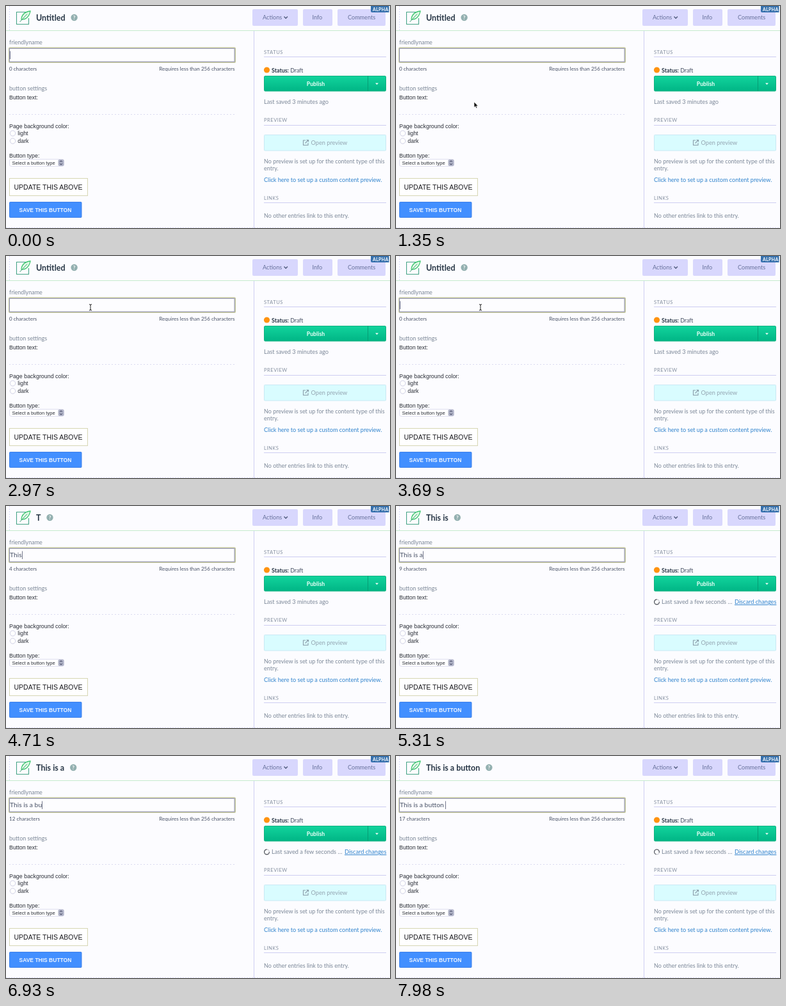
These frames come from a looping animation (600x347 px, 8000 ms). An HTML page:

```html
<!DOCTYPE html>
<html lang="en">
<head>
<meta charset="utf-8">
<title>Entry editor</title>
<style>
  html, body { margin: 0; width: 100%; height: 100%; overflow: hidden; background: #fcfcff; }
  svg { display: block; width: 100%; height: 100%; }
  text { font-family: Lato, sans-serif; font-size: 9.1px; fill: #7b8797; white-space: pre; }
  .form { font-family: "Liberation Sans", Arial, sans-serif; font-size: 8.9px; fill: #2a2e36; }
  .nav { font-size: 9.1px; fill: #66709a; }
  .head { font-size: 7.6px; letter-spacing: .5px; fill: #8590a0; }
  .count { font-size: 8.05px; fill: #475064; }
  .note { font-size: 9px; }
  .link { fill: #2e82cc; }
  .rule { stroke: #cdcdf2; fill: none; }
  .dots { stroke: #dcdcf8; fill: none; stroke-dasharray: 2 2; }
</style>
</head>
<body>
<svg viewBox="0 0 600 347" preserveAspectRatio="none">
  <defs>
    <linearGradient id="green" x2="0" y2="1">
      <stop offset="0" stop-color="#12d49d"/><stop offset="1" stop-color="#00b585"/>
    </linearGradient>
  </defs>
  <rect width="600" height="347" fill="#fcfcff"/>

  <g id="header">
    <path class="dots" d="M5.5 0V38"/>
    <path d="M0 38.5H600" stroke="#c5ebcd"/>
    <path d="M31 9.5H16.5V28.5H35.5V19" fill="none" stroke="#45a386" stroke-width="1.1"/>
    <path d="M38 8C30.500 9 24.500 13 24 21C31.500 21.500 36.500 16 38 8Z" fill="#e4f9e8" stroke="#3fc871" stroke-width="1.3"/>
    <path d="M21.500 25L33 12.500" stroke="#3a9f72"/>
    <text id="title" x="47" y="22.500" style="font-size:12.5px;font-weight:700;fill:#263545"></text>
    <g id="help">
      <circle r="5.2" cy="18" fill="#93b0b0"/>
      <text y="21" text-anchor="middle" style="font-size:8px;font-weight:700;fill:#fff">?</text>
    </g>
    <g fill="#d8d7fd">
      <rect x="385" y="5" width="71" height="26" rx="2"/>
      <rect x="464" y="5" width="46" height="26" rx="2"/>
      <rect x="518" y="5" width="75" height="26" rx="2"/>
    </g>
    <text class="nav" x="401" y="21">Actions</text>
    <path d="M434.500 16.500L437.200 19.200L439.900 16.500" fill="none" stroke="#4d587a" stroke-width="1.4"/>
    <text class="nav" x="478.500" y="21">Info</text>
    <text class="nav" x="534" y="21">Comments</text>
    <path d="M570 0H598.500V10H572Q570 10 570 8Z" fill="#3670ac"/>
    <text x="573" y="7.800" style="font-size:7px;font-weight:700;letter-spacing:.3px;fill:#fff">ALPHA</text>
  </g>

  <g id="form">
    <text class="note" x="5" y="60.200">friendlyname</text>
    <rect x="5" y="65.500" width="353" height="22.500" rx="1" fill="#fdfdff" stroke="#c3c69a" stroke-width="2"/>
    <rect x="5.500" y="66.500" width="351.500" height="20.500" fill="none" stroke="#9797c2"/>
    <text id="value" x="6" y="80" style="font-size:10.3px;fill:#465064"></text>
    <path id="caret" d="M.5 70.500V83" stroke="#74788c"/>
    <text id="count" class="count" x="5" y="101"></text>
    <text class="count" x="357.500" y="101" text-anchor="end">Requires less than 256 characters</text>

    <text class="note" x="5" y="132">button settings</text>
    <text class="form" x="5" y="146">Button text:</text>
    <path d="M5 169.500H357" stroke="#dadaf0" stroke-dasharray="2 3"/>
    <text class="form" x="5" y="190.500">Page background color:</text>
    <g fill="#fff" stroke="#c3c3dc" stroke-width=".8">
      <circle cx="10.500" cy="199" r="4.200"/><circle cx="10.500" cy="211" r="4.200"/>
    </g>
    <text class="form" x="18.300" y="202">light</text>
    <text class="form" x="18.300" y="214">dark</text>
    <text class="form" x="5" y="236.500">Button type:</text>
    <rect x="5.500" y="239.500" width="85" height="11" rx="2.500" fill="#fff" stroke="#d8d8ec" stroke-width=".8"/>
    <rect x="81.500" y="240" width="9" height="10" rx="2" fill="#b0b3c6"/>
    <path d="M84.100 244L86 241.800L87.900 244M84.100 246L86 248.200L87.900 246" fill="none" stroke="#3d4260"/>
    <text class="form" x="9.500" y="248" style="font-size:7.6px">Select a button type</text>
    <rect x="5.500" y="269.500" width="122" height="27" fill="#fff" stroke="#d6d6b4"/>
    <text class="form" x="12.500" y="287" style="font-size:10.5px;fill:#1a1a1e">UPDATE THIS ABOVE</text>
    <rect x="5.500" y="306.500" width="112.500" height="24" rx="1" fill="#428fff" stroke="#3d80ea"/>
    <text class="form" x="20.500" y="321.500" style="font-size:8.5px;font-weight:700;fill:#eef5ff">SAVE THIS BUTTON</text>
  </g>

  <g id="sidebar">
    <path class="rule" d="M387.500 39V347"/>
    <path class="dots" d="M0 346.500H600"/>
    <text class="head" x="403" y="75">STATUS</text>
    <text class="head" x="403" y="181">PREVIEW</text>
    <text class="head" x="403" y="302.500">LINKS</text>
    <path class="rule" d="M403 79.500H594M403 186.500H594M403 307.500H594"/>
    <circle cx="407.500" cy="100" r="4.600" fill="#ff930f"/>
    <text x="415" y="103.500" style="font-size:8.9px;fill:#475064"><tspan font-weight="700" fill="#263545">Status:</tspan> Draft</text>
    <rect x="403.500" y="109.500" width="190" height="23.500" rx="1.500" fill="url(#green)" stroke="#0db27f"/>
    <path d="M565.500 109V133" stroke="#069d74"/>
    <text x="484" y="124.500" text-anchor="middle" style="font-size:8.7px;font-weight:700;fill:#ecfff8">Publish</text>
    <path d="M577 120.500H582L579.500 123Z" fill="#fff"/>

    <text id="idle" x="403" y="153" style="font-size:9.2px">Last saved 3 minutes ago</text>
    <g id="saving">
      <circle cx="407.500" cy="150" r="3.900" fill="none" stroke="#c6c8ce" stroke-width="1.200"/>
      <path id="spin" d="M407.500 146.100A3.900 3.900 0 1 0 411.400 150" fill="none" stroke="#55585f" stroke-width="1.200"/>
      <text x="415" y="153" style="font-size:9.2px">Last saved a few seconds …</text>
      <text class="link" x="529" y="153" text-decoration="underline" style="font-size:9.2px">Discard changes</text>
    </g>

    <rect x="403.500" y="201.500" width="190" height="24.500" rx="1" fill="#d9fcff" stroke="#c8e9f4"/>
    <path d="M468 210H464.500V217.500H472V214M469.500 209.500H472.500V212.500M472.500 209.500L467.500 214.500" fill="none" stroke="#8a9ca8" stroke-width="1.100"/>
    <text x="476.500" y="217" style="font-size:9.2px;fill:#93a4b0">Open preview</text>
    <text class="note" x="403" y="245.500">No preview is set up for the content type of this</text>
    <text class="note" x="403" y="257">entry.</text>
    <text class="link" x="403" y="274.500">Click here to set up a custom content preview.</text>
    <text class="note" x="403" y="331">No other entries link to this entry.</text>
  </g>

  <g id="mouse">
    <path id="arrow" d="M0 0V8.500L2 6.700L3.400 9.700L4.800 9L3.500 6.200H6.200Z" fill="#111" stroke="#fff" stroke-width=".6"/>
    <path id="beam" d="M-2 -4.500Q0 -4.500 0 -3Q0 -4.500 2 -4.500M0 -3.500V4M-2 5Q0 5 0 3.500Q0 5 2 5" fill="none" stroke="#222"/>
  </g>
</svg>
<script>
const LOOP = 8000, TEXT = 'This is a button ', CLICK = 2250, SAVE = 5000, TITLE_LAG = 250;
// Typing bursts: start, delay per key, number of keys
const bursts = [[4370, 110, 9], [6700, 100, 3], [7080, 110, 5]];
const keys = bursts.flatMap(([start, step, n]) => Array.from({ length: n }, (_, i) => start + i * step));
// Pointer path: time, x, y
const path = [[700, 148, 356], [1250, 122, 150], [1450, 122, 150], [2100, 132, 80], [LOOP, 132, 80]];

const el = {};
document.querySelectorAll('[id]').forEach(node => el[node.id] = node);
const show = (node, on) => node.setAttribute('visibility', on ? 'inherit' : 'hidden');
const move = (node, x, y) => node.setAttribute('transform', `translate(${x} ${y})`);
const put = (node, s) => { if (node.textContent !== s) node.textContent = s; };
const typed = t => keys.filter(k => k <= t).length;

function pointer(t) {
  const i = Math.max(1, path.findIndex(p => t < p[0]));
  const [a, b] = [path[i - 1], path[i]];
  const u = Math.min(1, Math.max(0, (t - a[0]) / (b[0] - a[0])));
  const e = u * u * (3 - 2 * u);
  return [a[1] + (b[1] - a[1]) * e, a[2] + (b[2] - a[2]) * e];
}

function draw(t) {
  const n = typed(t);
  put(el.value, TEXT.slice(0, n).replace(/ /g, '\u00a0'));
  put(el.count, n + ' characters');
  put(el.title, TEXT.slice(0, typed(t - TITLE_LAG)).trim() || 'Untitled');
  move(el.help, 47 + el.title.getComputedTextLength() + 14, 0);

  // The caret restarts its blink at each click or key
  const last = n ? keys[n - 1] : t >= CLICK ? CLICK : -200;
  show(el.caret, (t - last) % 1000 < 500);
  move(el.caret, Math.round(6 + (n ? el.value.getComputedTextLength() : 0)), 0);

  show(el.idle, t < SAVE);
  show(el.saving, t >= SAVE);
  el.spin.setAttribute('transform', `rotate(${(t - SAVE) / 810 * 360 - 138} 407.5 150)`);

  const [x, y] = pointer(t), inField = y > 66 && y < 88;
  show(el.mouse, t >= path[0][0] && t < keys[0]);
  move(el.mouse, x, y);
  show(el.arrow, !inField);
  show(el.beam, inField);
}

const begin = performance.now();
function tick() {
  draw((performance.now() - begin) % LOOP);
  requestAnimationFrame(tick);
}
tick();
</script>
</body>
</html>
```
